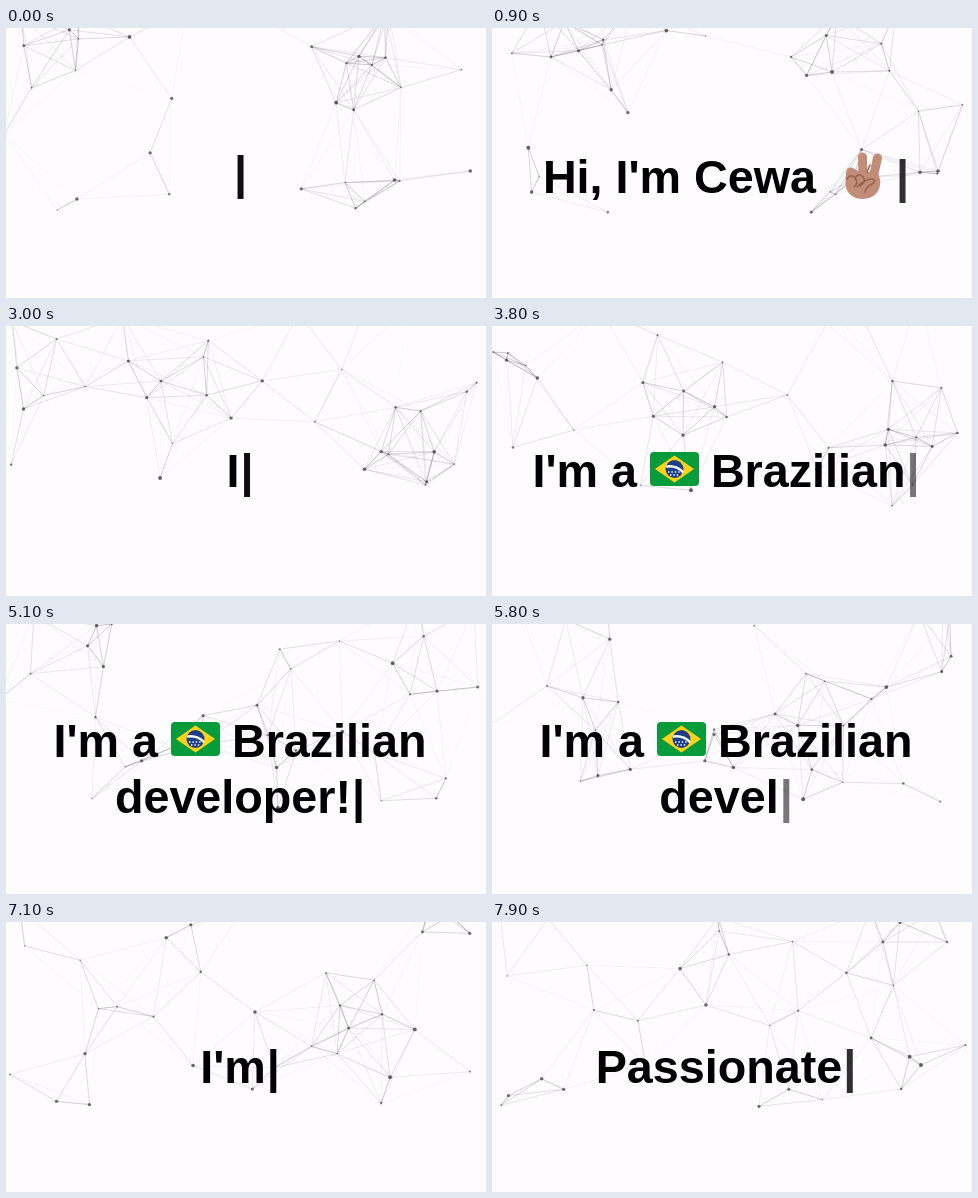
Recreate the animation shown at these times as an HTML page with a canvas. Size 480x270 px, loop 8000 ms.

```html
<!DOCTYPE html>
<html lang="en">
<head>
<meta charset="utf-8">
<title>Typewriter intro</title>
<style>
  html, body { margin: 0; width: 100%; height: 100%; overflow: hidden; background: #fefcff; }
  canvas { position: absolute; left: 0; top: 0; }
  p {
    position: absolute; left: 0; top: 145px; width: 468px; margin: 0;
    transform: translateY(-50%);
    font: bold 46.7px/56px "Liberation Sans", Arial, sans-serif;
    text-align: center; color: #000;
  }
  .icon { display: inline-block; position: relative; }
  .icon svg { position: absolute; }
  .flag { width: 48px; height: 1px; }
  .flag svg { left: 0; bottom: 1px; }
  .hand { width: 66px; height: 52px; }
  .hand svg { left: 15px; bottom: -7px; }
  #cursor { margin-left: 1px; animation: blink 1s infinite paused; }
  @keyframes blink { 0%, 100% { opacity: 0; } 50% { opacity: 1; } }
</style>
</head>
<body>
<canvas id="net" width="475" height="186"></canvas>
<p><span id="text"></span><span id="cursor">|</span></p>

<template id="flag"><span class="icon flag"><svg width="49" height="34" viewBox="0 0 49 34">
  <rect width="49" height="34" rx="4" fill="#079b3c"/>
  <path d="M24.5 3.5 44 17 24.5 30.5 5 17Z" fill="#fdd217"/>
  <circle cx="24.5" cy="17" r="9" fill="#1c3f8c"/>
  <path d="M16 14.6Q26 13 33 20" fill="none" stroke="#fff" stroke-width="2.4"/>
  <path d="M18 20h15M20 23h10" stroke="#fff" stroke-width="1.4" stroke-dasharray="1.4 2"/>
</svg></span></template>

<template id="hand"><span class="icon hand"><svg width="40" height="48" viewBox="0 0 40 48">
  <path d="M19 26 18.5 5M29 26 33.5 6" fill="none" stroke="#c18c78" stroke-width="9" stroke-linecap="round"/>
  <path d="M1.5 30 2 21Q3 14 9 16L14 19 33 20C39 28 38 46 19 47 8 47 1 40 1.5 30Z" fill="#c18c78"/>
  <path d="M23 20 26 13M3 27Q7 21 11 26T10 35M11 26Q15 20 19 25T16 34M13 35Q22 26 29 27 33 29 28 32 23 34 21 40"
    fill="none" stroke="#95614f" stroke-width="1.5" stroke-linecap="round"/>
</svg></span></template>

<script>
const LOOP = 8000, FRAME = 100, TYPE = 50, ERASE = 66, BLINK_PHASE = 355;
const byId = id => document.getElementById(id);
const textBox = byId('text'), cursor = byId('cursor'), net = byId('net');
const ctx = net.getContext('2d');

const icons = { '⚑': byId('flag').innerHTML, '✌': byId('hand').innerHTML };
const phrases = [
  { chars: [..."Hi, I'm Cewa ✌"], start: 80, erase: 2000 },
  { chars: [..."I'm a ⚑ Brazilian developer!"], start: 2970, erase: 5500 },
  { chars: [...'Passionate'], start: 7400, erase: Infinity }
];

const ticks = (t, from, step) => t < from ? 0 : Math.floor((t - from) / step) + 1;

function typedText(t) {
  const { chars, start, erase } = phrases.findLast(p => t >= p.start) || phrases[0];
  const typed = Math.min(chars.length, ticks(t, start, TYPE));
  const count = Math.max(0, typed - ticks(t, erase, ERASE));
  return chars.slice(0, count).map(c => icons[c] || c).join('');
}

const AREA = { left: -8, right: 474, top: -30, bottom: 185 };
const COUNT = 34, REACH = 105;

let seed = 41;
const random = () => (seed = seed * 16807 % 2147483647) / 2147483647;
const between = (min, max) => min + (max - min) * random();

const particles = Array.from({ length: COUNT }, () => {
  const angle = between(0, 2 * Math.PI), speed = between(30, 60);
  return {
    x: between(AREA.left, AREA.right),
    y: between(AREA.top, AREA.bottom),
    r: between(.7, 2),
    vx: speed * Math.cos(angle),
    vy: speed * Math.sin(angle)
  };
});

// Reflects a straight path between two walls
function bounce(v, min, max) {
  const size = max - min, span = 2 * size;
  const u = ((v - min) % span + span) % span;
  return min + (u < size ? u : span - u);
}

function drawNet(t) {
  const s = t / 1000;
  const dots = particles.map(p => ({
    x: bounce(p.x + p.vx * s, AREA.left, AREA.right),
    y: bounce(p.y + p.vy * s, AREA.top, AREA.bottom),
    r: p.r
  }));
  ctx.clearRect(0, 0, net.width, net.height);
  ctx.lineWidth = .65;
  dots.forEach((a, i) => {
    for (const b of dots.slice(i + 1)) {
      const d = Math.hypot(a.x - b.x, a.y - b.y);
      if (d >= REACH) continue;
      ctx.strokeStyle = `rgba(50,50,50,${.5 * (1 - d / REACH)})`;
      ctx.beginPath();
      ctx.moveTo(a.x, a.y);
      ctx.lineTo(b.x, b.y);
      ctx.stroke();
    }
  });
  for (const { x, y, r } of dots) {
    ctx.fillStyle = `rgba(50,50,50,${.35 + .2 * r})`;
    ctx.beginPath();
    ctx.arc(x, y, r, 0, 2 * Math.PI);
    ctx.fill();
  }
}

let origin = null, shown = -1;
function tick(now) {
  origin ??= now;
  const t = Math.floor((now - origin + 1) / FRAME) * FRAME % LOOP;
  if (t !== shown) {
    shown = t;
    textBox.innerHTML = typedText(t);
    cursor.style.animationDelay = `${-(t + BLINK_PHASE)}ms`;
    drawNet(t);
  }
  requestAnimationFrame(tick);
}
requestAnimationFrame(tick);
</script>
</body>
</html>
```
